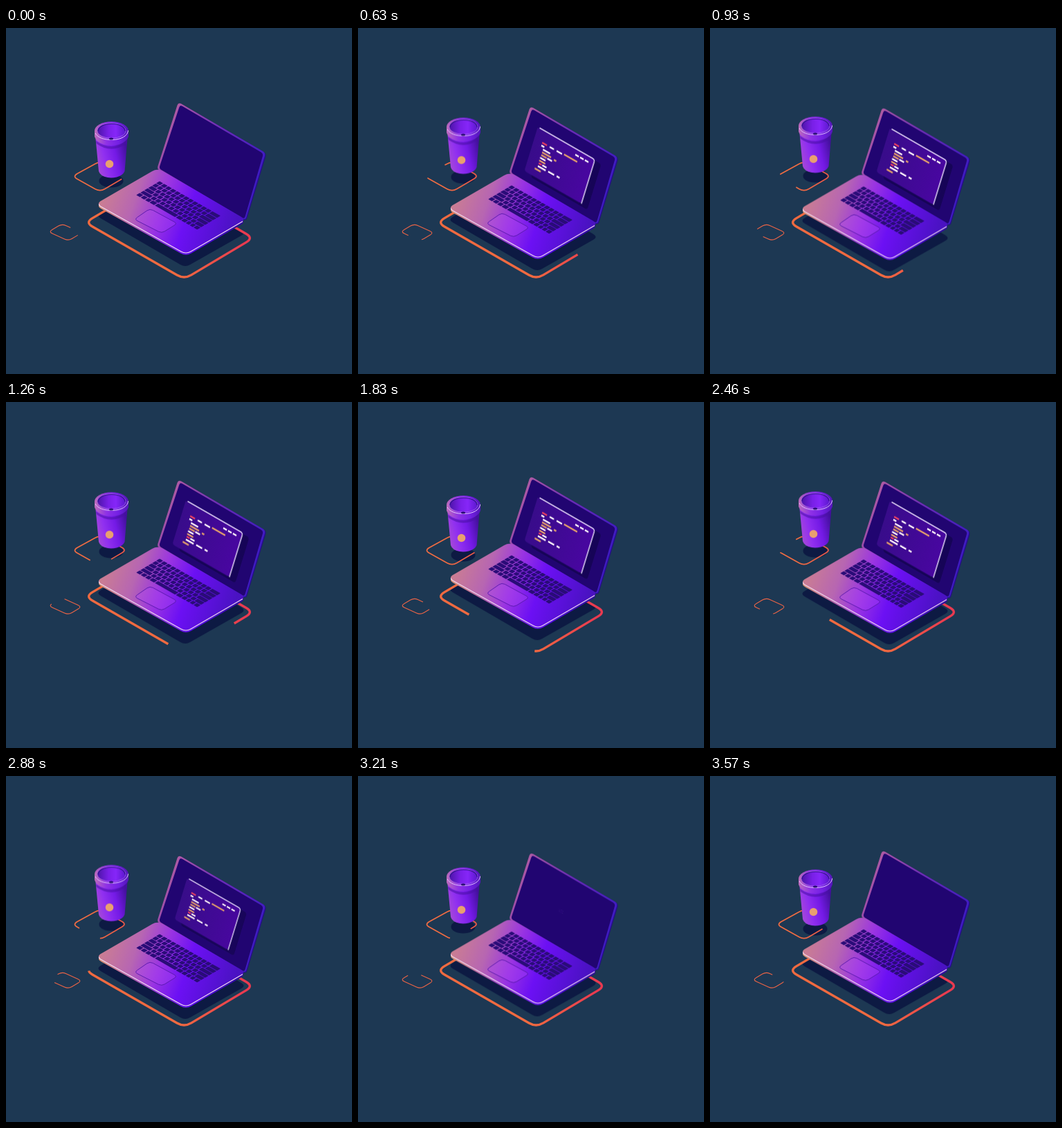
An HTML page for the animation above (3630 ms loop, 500 px wide and 500 px high).

```html
<!DOCTYPE html>
<html lang="en">
<head>
<meta charset="utf-8">
<title>Laptop and cup</title>
<style>
  html, body { margin: 0; width: 100%; height: 100%; overflow: hidden; background: #1d3853; }
  svg { display: block; width: 100vw; height: 100vh; }

  .laptop, .cup { animation: 907.5ms cubic-bezier(.37, 0, .63, 1) infinite alternate; }
  .laptop { animation-name: sink; }
  .cup { animation-name: lift; }
  @keyframes sink { to { transform: translateY(7.5px); } }
  @keyframes lift { to { transform: translateY(-7.2px); } }

  .trace { fill: none; stroke-dasharray: 80 20; animation: run 3630ms linear infinite; }
  .trace.big { --from: 11; --to: -89; stroke: url(#glowBig); stroke-width: 3.4; }
  .trace.mid { --from: -.3; --to: 199.7; stroke: url(#glowMid); stroke-width: 1.7; }
  .trace.small { --from: -28.5; --to: -228.5; stroke: #ec6446; stroke-width: 1.1; stroke-dasharray: 79 21; }
  @keyframes run {
    from { stroke-dashoffset: var(--from); }
    to { stroke-dashoffset: var(--to); }
  }

  .window { transform-origin: 46px 32px; animation: pop 3630ms infinite; }
  @keyframes pop {
    0%, 3% { transform: scale(0); opacity: 0; animation-timing-function: cubic-bezier(.2, .7, .3, 1); }
    14%, 77% { transform: none; opacity: 1; animation-timing-function: cubic-bezier(.42, 0, 1, 1); }
    89%, 100% { transform: scale(0); opacity: 0; }
  }
  .code { stroke-width: 2.4; }
</style>
</head>
<body>
<svg viewBox="0 0 500 500">
  <defs>
    <linearGradient id="glowBig" gradientUnits="userSpaceOnUse" x1="250" x2="345" y1="0" y2="0">
      <stop stop-color="#f06a40"/><stop offset="1" stop-color="#e93a50"/>
    </linearGradient>
    <linearGradient id="glowMid" gradientUnits="userSpaceOnUse" x1="125" x2="172" y1="0" y2="0">
      <stop stop-color="#ef6c42"/><stop offset="1" stop-color="#e95848"/>
    </linearGradient>
    <linearGradient id="lid" gradientUnits="userSpaceOnUse" x1="228" y1="130" x2="365" y2="205">
      <stop stop-color="#b660a2"/><stop offset=".5" stop-color="#6c2cb8"/><stop offset="1" stop-color="#401cc2"/>
    </linearGradient>
    <linearGradient id="deck" gradientUnits="userSpaceOnUse" x1="145" y1="225" x2="330" y2="290">
      <stop stop-color="#cb7e92"/><stop offset=".24" stop-color="#b766b2"/>
      <stop offset=".44" stop-color="#9a34e2"/><stop offset=".64" stop-color="#6c10f4"/>
      <stop offset="1" stop-color="#4a12c2"/>
    </linearGradient>
    <linearGradient id="edge" gradientUnits="userSpaceOnUse" x1="134" x2="345" y1="0" y2="0">
      <stop stop-color="#dc9478"/><stop offset=".4" stop-color="#9038d8"/>
      <stop offset=".65" stop-color="#5a0cf0"/><stop offset="1" stop-color="#2c0c98"/>
    </linearGradient>
    <linearGradient id="pane"><stop stop-color="#380c8a"/><stop offset="1" stop-color="#4806a0"/></linearGradient>
    <linearGradient id="body" x1="0" y1=".65" x2="1" y2=".35">
      <stop stop-color="#a84cd4"/><stop offset=".3" stop-color="#9130f0"/>
      <stop offset=".65" stop-color="#741ae6"/><stop offset="1" stop-color="#43109c"/>
    </linearGradient>
    <linearGradient id="rim">
      <stop stop-color="#bd6cba"/><stop offset=".35" stop-color="#8f32e6"/>
      <stop offset=".7" stop-color="#7420e4"/><stop offset="1" stop-color="#5216b8"/>
    </linearGradient>
    <linearGradient id="hole">
      <stop stop-color="#4c14a8"/><stop offset=".4" stop-color="#7a20e8"/>
      <stop offset=".65" stop-color="#8626f8"/><stop offset="1" stop-color="#5a18cc"/>
    </linearGradient>
  </defs>

  <g fill="#0d1a43">
    <path class="laptop" data-r="8" data-pts="130,271 219,219 347,296 259,346"/>
    <ellipse class="cup" cx="152" cy="221" rx="17.5" ry="9.5"/>
  </g>

  <path class="trace big" pathLength="100" data-r="12" data-pts="357.5,303.5 257.5,363 114.5,281 215.5,221.5"/>
  <path class="trace mid" pathLength="100" data-r="8" data-pts="174.5,214 136,236.5 96,214.5 135.5,192.5"/>
  <path class="trace small" pathLength="100" data-r="6" data-pts="81,283 109.5,296 90,307.5 61.5,294.5"/>

  <g class="cup">
    <path fill="url(#body)" d="M129.5 160L134 207Q136 214 147 216Q153 217 160 215.5Q169 213 171.5 207L175.5 160Z"/>
    <path fill="#4a10a6" opacity=".55" d="M130 163Q152 179 175 163L174.6 167Q152 182.5 130.5 167Z"/>
    <path fill="url(#rim)" d="M128 148V157Q130 164 141 168Q152 171.5 164 168Q175 164 177 157V148Z"/>
    <ellipse cx="152.5" cy="148.5" rx="24.5" ry="13.2" fill="url(#rim)"/>
    <path fill="none" stroke="#e3c8ff" d="M129 152C133 159 142 161.5 153 161.5C166 161.5 176 156 176.6 148"/>
    <ellipse cx="152.5" cy="148.5" rx="20.5" ry="10.8" fill="url(#hole)" stroke="#d3aef8" stroke-opacity=".5" stroke-width=".8"/>
    <path fill="none" stroke="#340e90" stroke-width="1.2" d="M133 149C133 135 172 135 172 149"/>
    <ellipse cx="152" cy="160" rx="3" ry="1.5" fill="#260b70"/>
    <circle cx="149.5" cy="196.5" r="5.8" fill="#e9a06f"/>
  </g>

  <g class="laptop">
    <path fill="#250d8c" data-r="5" data-pts="250,107.8 376.5,181.5 347,279 219,205"/>
    <path fill="url(#lid)" data-r="5" data-pts="249,107 375.3,180.5 346,278 218,204"/>
    <path fill="#210571" data-r="4" data-pts="251.5,111 372,181.5 344.5,276 221,203"/>

    <g transform="matrix(.867 .498 -.293 .956 262.5 138.5)">
      <g class="window">
        <rect x="9" y="1" width="94" height="69" rx="4" fill="#160457"/>
        <rect x="-3" width="95" height="66.5" rx="4" fill="url(#pane)"/>
        <path fill="none" stroke="#efe4ff" stroke-width="1.4" d="M0 0H88Q92 0 92 4V66.5"/>
        <g class="code" id="code"></g>
      </g>
    </g>

    <path fill="url(#edge)" data-r="9" data-pts="130,257 219,206 347,280 260,330"/>
    <path fill="url(#deck)" data-r="9" data-pts="130,254 219,202.5 347,277 260,327"/>
    <path fill="none" stroke="#f3daf3" stroke-width="1.2" d="M134.5 254.5Q134 256 137 258L253 323Q260 327 267 323L342 279.5"/>
    <g id="keys" fill="#2a0c78"></g>
    <path fill="#b048f4" fill-opacity=".35" stroke="#5618ac" stroke-width=".9" data-r="5" data-pts="185.5,276.5 208,261 247.5,282.5 225,296.5"/>
  </g>
</svg>
<script>
  const NS = 'http://www.w3.org/2000/svg';
  const add = (parent, d, attrs = {}) => {
    const path = document.createElementNS(NS, 'path');
    Object.entries({ d, ...attrs }).forEach(([k, v]) => path.setAttribute(k, v));
    parent.append(path);
  };

  // Polygon with rounded corners, starting just past the first corner.
  function rounded(pts, r) {
    const toward = (a, b) => {
      const k = r / Math.hypot(b[0] - a[0], b[1] - a[1]);
      return [a[0] + (b[0] - a[0]) * k, a[1] + (b[1] - a[1]) * k];
    };
    const n = pts.length;
    let d = 'M' + toward(pts[0], pts[1]);
    for (let i = 1; i <= n; i++) {
      const p = pts[i % n];
      d += `L${toward(p, pts[i - 1])}Q${p} ${toward(p, pts[(i + 1) % n])}`;
    }
    return d + 'Z';
  }

  document.querySelectorAll('[data-pts]').forEach(el => {
    const pts = el.dataset.pts.split(' ').map(p => p.split(',').map(Number));
    el.setAttribute('d', rounded(pts, +el.dataset.r));
  });

  // Code dashes: row, start, length, colour
  const W = '#fff4fa', O = '#e5a06a', R = '#ea4060';
  const dashes = [
    [8, 62, 6, W], [8, 70, 6, W], [8, 78, 6, W],
    [17, 10, 8, R], [17, 22.5, 7, W], [17, 34, 9, W], [16, 46, 22, O],
    [21.3, 10, 5, W], [25.3, 14, 12, W],
    [29.5, 14, 15, O], [30.5, 34, 4, O],
    [33.6, 14, 9, O], [33.6, 24, 8, W],
    [37.8, 13.5, 9, W], [42, 13.5, 10, O],
    [46, 14, 5, R], [46, 20, 7, W],
    [50.3, 14, 13, W], [49.8, 31, 10, W], [49.5, 45, 5, W],
    [55.5, 10.5, 10, O]
  ];
  const code = document.getElementById('code');
  dashes.forEach(([v, u, w, stroke]) => add(code, `M${u} ${v}h${w}`, { stroke }));

  // Keyboard on the deck: u runs along a row, v across rows.
  const keys = document.getElementById('keys');
  const spot = (u, v) => [221.8 + 89 * u - 34.5 * v, 221 + 50.5 * u + 20.3 * v];
  const key = (u0, u1, row) => {
    const a = u0 / 14 + .006, b = u1 / 14 - .006;
    const c = (row + .06) / 6, e = (row + .93) / 6;
    add(keys, rounded([spot(a, c), spot(b, c), spot(b, e), spot(a, e)], .7));
  };
  const firstKey = [1, 1, 1.5, 1.8, 2.3];
  firstKey.forEach((first, row) => {
    key(0, first, row);
    for (let u = first; u < 12.4; u++) key(u, u > 11.4 ? 14 : u + 1, row);
  });
  [0, 1, 2, 3, 4.2, 9, 10.2, 11.2, 12.1, 13, 14].forEach((u, i, list) => {
    if (i) key(list[i - 1], u, 5);
  });
</script>
</body>
</html>
```
